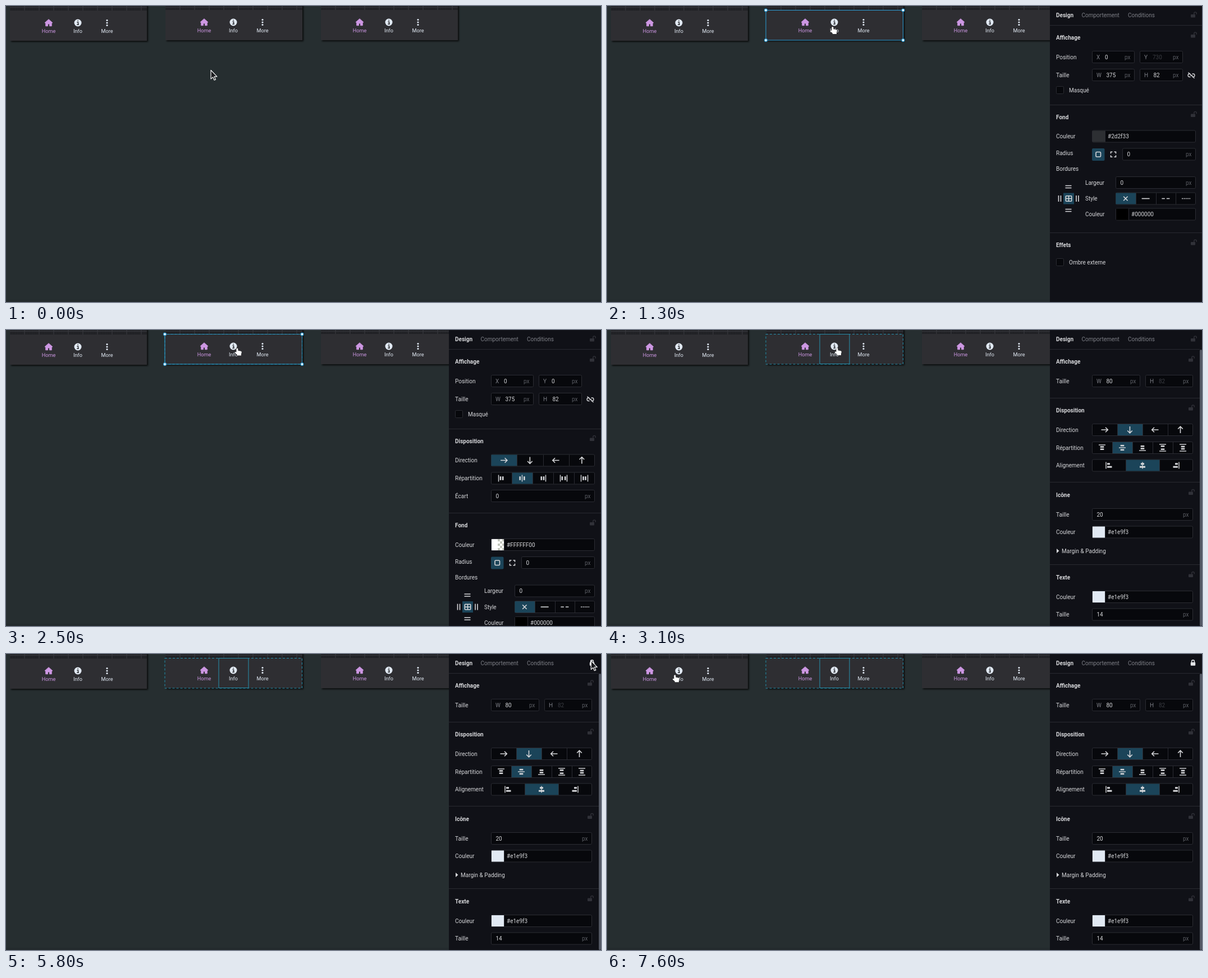
Write an HTML page that moves like this. It is 1060 by 528 pixels and loops after 8000 ms.

```html
<!DOCTYPE html>
<html lang="fr">
<head>
<meta charset="utf-8">
<title>Design panel</title>
<style>
  html, body { margin: 0; width: 100%; height: 100%; overflow: hidden; background: #262e30; }
  svg { display: block; }
  text { font: 10px Roboto, sans-serif; fill: #d6d7da; white-space: pre; }
  .bold { font-weight: 700; }
  .tab { fill: #7d7f86; }
  .unit { fill: #5b5d64; }
  .off { fill: #3b3d43; }
  .bar text { font-size: 9.1px; text-anchor: middle; fill: #e1e9f3; }
  .bar .on { fill: #cd97e3; }
  .ico { fill: none; stroke: #d6d7da; stroke-width: 1.6; }
  .box { fill: #07080c; stroke: #2b2c33; }
  .active { fill: #1b4459; }
  .lock { fill: none; stroke: #303138; stroke-width: 1.4; }
  .edge { fill: none; stroke: #2f9fd8; }
  .knob { fill: #fff; stroke: #2f9fd8; stroke-width: 1.2; }
  .dash { stroke: #2790ad; stroke-dasharray: 4 3; }
</style>
</head>
<body>
<svg id="stage" width="1060" height="528" viewBox="0 0 1060 528">
  <defs>
    <filter id="shadow" x="-10%" y="-30%" width="120%" height="160%">
      <feDropShadow dx="2" dy="2" stdDeviation="1.8" flood-color="#000" flood-opacity=".75"/>
    </filter>
    <pattern id="fine" width="2.6" height="2.6" patternUnits="userSpaceOnUse">
      <path d="M0 .5H2.6M.5 0V2.6" stroke="#fff" stroke-opacity=".05" stroke-width=".6"/>
    </pattern>
  </defs>
</svg>
<script>
const LOOP = 8000;
const rect = (x, y, w, h, attrs = '') => `<rect x="${x}" y="${y}" width="${w}" height="${h}" ${attrs}/>`;
const path = (d, cls = 'ico', extra = '') => `<path d="${d}" class="${cls}" ${extra}/>`;
const at = (x, y, body, turn = 0) => `<g transform="translate(${x} ${y}) rotate(${turn})">${body}</g>`;
const group = (id, body) => `<g id="${id}">${body}</g>`;
const label = (x, y, s, cls = '') =>
  `<text x="${x}" y="${y + 3.5}" class="${cls}">${s.replace('&', '&amp;')}</text>`;
const box = (x0, x1, y, h = 21) => rect(x0 + .5, y - 10.5, x1 - x0 - 1, h, 'class="box" rx="2"');

// Preview bars
function bar(x, y, id) {
  let grid = rect(0, -y, 244, y, 'fill="#1c1d21"') + rect(0, -y, 244, y, 'fill="url(#fine)"');
  for (let gx = 25.5; gx < 244; gx += 26) grid += rect(gx, -y, 1, y, 'fill="#3c3d42"');
  grid += rect(0, 2 - y, 244, 1, 'fill="#37383d"');
  const home = path('M0-6.3L7 0H5.3V5.8H1.5V2H-1.5V5.8H-5.3V0H-7Z', '',
    'fill="#cd97e3" stroke="#cd97e3" stroke-width=".9" stroke-linejoin="round"');
  const info = '<circle r="6.5" fill="#e1e9f3"/>' +
    path('M-1.5-.7H.6V3M-1.8 3.2H1.9M-.7-3.6H.9', '', 'fill="none" stroke="#2d2f33" stroke-width="1.5"');
  const dots = [-4.5, 0, 4.5].map(d => `<circle cy="${d}" r="1.6" fill="#e1e9f3"/>`).join('');
  return `<g class="bar" transform="translate(${x} ${y})">
    <g filter="url(#shadow)">${rect(0, -y - 12, 244, y + 66, 'fill="#2d2f33"')}</g>
    ${grid}${at(69, 22, home)}${at(121, 22, info)}${at(173, 22, dots)}
    ${label(69, 36.7, 'Home', 'on')}${label(121, 36.7, 'Info')}${label(173, 36.7, 'More')}</g>`;
}

const frame = cls => rect(283, 7.5, 244.5, 53.5, `class="edge ${cls}"`);
const knobs = [283, 527.5].map(x => [7.5, 61].map(y =>
  `<circle cx="${x}" cy="${y}" r="2.4" class="knob"/>`).join('')).join('');

// Panel parts
const lock = (x, y) => at(x, y, rect(-5, -.5, 8, 5.5, 'rx="1" fill="#303138"') +
  path('M.8-.5V-2.4A2.2 2.2 0 0 1 5.2-2.4V-.8', 'lock'));
const closedLock = at(1044, 15.5, rect(-4.2, -.8, 8.4, 6, 'rx="1" fill="#e4e5e8"') +
  path('M-2.4-.5V-2.2A2.4 2.4 0 0 1 2.4-2.2V-.5', 'ico'));
const divider = (y, end = 1060) => rect(789, y, end - 789, 1, 'fill="#292a31"');
const section = (y, title, lockX = 1045) => label(800, y, title, 'bold') + lock(lockX, y - 5);

function field(x0, x1, y, value, { name = '', cls = '', valueX = x0 + 8.5, unit = true } = {}) {
  return box(x0, x1, y) + (name && label(x0 + 8, y, name, 'tab')) + label(valueX, y, value, cls) +
    (unit ? label(x1 - 18, y, 'px', 'unit') : '');
}
function color(x0, x1, y, value, fill) {
  return field(x0, x1, y, value, { valueX: x0 + 28, unit: false }) +
    rect(x0 + 1, y - 10, 22, 20, `fill="${fill}"`) + rect(x0 + 23, y - 10, 1, 20, 'fill="#2b2c33"');
}
function buttons(x0, x1, y, active, icons) {
  const w = (x1 - x0) / icons.length;
  let out = box(x0, x1, y) + rect(x0 + active * w + .5, y - 10, w, 20, 'class="active"');
  icons.forEach((icon, i) => {
    if (i) out += rect(Math.round(x0 + i * w), y - 10, 1, 20, 'fill="#2b2c33"');
    out += at(x0 + (i + .5) * w, y, icon);
  });
  return out;
}
const checkbox = (y, name) => rect(800.5, y - 6.5, 13, 13, 'class="box" rx="2"') + label(823, y, name);

const arrow = turn => at(0, 0, path('M-6 0H5.5M1.5-4.3L5.8 0L1.5 4.3'), turn);
const arrows = [0, 90, 180, 270].map(arrow);
const line = x => rect(x - .7, -6, 1.4, 12, 'fill="#d6d7da"');
const block = x => rect(x - 1.3, -3.3, 2.6, 6.6, 'fill="#d6d7da"');
const spreads = [
  line(-5) + block(-1.5) + block(2.7),
  block(-3.8) + line(0) + block(3.8),
  block(-2.7) + block(1.5) + line(5),
  line(-6) + block(-2.7) + block(2.7) + line(6),
  line(-6) + block(-2) + block(2) + line(6)
];
const strip = (x, y, w) => rect(x, y - 1.5, w, 3, 'fill="#d6d7da"');
const aligns = [
  line(-5) + strip(-3, -2.7, 5) + strip(-3, 2.7, 8.5),
  line(0) + strip(-3, -2.7, 6) + strip(-5, 2.7, 10),
  line(5) + strip(-2, -2.7, 5) + strip(-5.5, 2.7, 8.5)
];
const strokes = [
  path('M-3.7-3.7L3.7 3.7M3.7-3.7L-3.7 3.7'),
  path('M-7 0H7'),
  path('M-7 0H-1.5M1.5 0H7'),
  path('M-7 0H8', 'ico', 'stroke-dasharray="2 1.3"')
];
const pair = path('M-5.5-2H5.5M-5.5 2H5.5');

const header = end => rect(789, 0, 271, 528, 'fill="#101117"') +
  label(800, 16, 'Design', 'bold') + label(845.5, 16, 'Comportement', 'tab') +
  label(928, 16, 'Conditions', 'tab') + divider(34, end);

const display = (y, cls) => section(56.5, 'Affichage') + label(800, 91, 'Position') +
  field(864, 940, 91, '0', { name: 'X', valueX: 887 }) +
  field(949, 1026, 91, y, { name: 'Y', valueX: 972, cls }) + label(800, 123, 'Taille') +
  field(864, 940, 123, '375', { name: 'W', valueX: 889.5 }) +
  field(949, 1026, 123, '82', { name: 'H', valueX: 973.5 }) +
  at(1041, 123.5, path('M-1.5-2.5H-3.2A2.7 2.7 0 0 0-3.2 3H-1.5M1.5-2.5H3.2A2.7 2.7 0 0 1 3.2 3H1.5M-2 .2H2M-5.5-5L5.5 5.5',
    'ico', 'style="stroke-width:1.3"')) +
  checkbox(150, 'Masqué') + divider(176);

const background = (dy, value, fill) => section(198 + dy, 'Fond') +
  label(800, 232.5 + dy, 'Couleur') + color(864, 1049, 232.5 + dy, value, fill) +
  label(800, 262.5 + dy, 'Radius') + rect(864, 254 + dy, 22.5, 22, 'class="active" rx="2"') +
  rect(871, 260.5 + dy, 8.5, 8.5, 'class="ico" rx="1.5"') +
  at(902, 264.8 + dy, path('M-4.5-1.5V-4.5H-1.5M1.5-4.5H4.5V-1.5M4.5 1.5V4.5H1.5M-1.5 4.5H-4.5V1.5')) +
  field(918, 1049, 264.5 + dy, '0') + label(800, 290.5 + dy, 'Bordures') +
  at(822, 322.5 + dy, pair) + at(822, 364.5 + dy, pair) +
  at(806.5, 343.5 + dy, pair, 90) + at(838, 343.5 + dy, pair, 90) +
  rect(813, 333.5 + dy, 19, 20, 'class="active"') +
  at(822.5, 343.5 + dy, rect(-5.2, -4.7, 10.4, 9.4, 'class="ico" rx="1"') + path('M0-4.7V4.7M-5.2 0H5.2')) +
  label(852, 315 + dy, 'Largeur') + field(906, 1049, 315 + dy, '0') +
  label(852, 343.5 + dy, 'Style') + buttons(906, 1049, 343.5 + dy, 0, strokes) +
  label(852, 371.5 + dy, 'Couleur') + color(906, 1049, 371.5 + dy, '#000000', '#000');

const checker = () => {
  let out = rect(865, 373, 22, 20, 'fill="#fff"');
  for (let r = 0; r < 5; r++)
    for (let c = r % 2; c < 3; c += 2) out += rect(876 + c * 4, 373 + r * 4, c < 2 ? 4 : 3, 4, 'fill="#c3c7bd"');
  return out;
};

const barPanel = header() + lock(1045, 15.5) + display('730', 'off') + background(0, '#2d2f33', '#2d2f33') +
  divider(404) + section(426.5, 'Effets') + checkbox(457, 'Ombre externe');

const rowPanel = header() + lock(1045, 15.5) + display('0', '') + section(198, 'Disposition') +
  label(800, 232.5, 'Direction') + buttons(864, 1049, 232.5, 0, arrows) +
  label(800, 264.5, 'Répartition') + buttons(864, 1049, 264.5, 1, spreads) +
  label(800, 296, 'Écart') + field(864, 1049, 296, '0') + divider(326) +
  background(150.5, '#FFFFFF00', '#fff') + checker();

const itemPanel = header(1056) + section(56.5, 'Affichage', 1041) + label(800, 91, 'Taille') +
  field(864, 950, 91, '80', { name: 'W', valueX: 889.5 }) +
  field(959, 1044, 91, '82', { name: 'H', valueX: 983, cls: 'off' }) + divider(121, 1056) +
  section(143.5, 'Disposition', 1041) +
  label(800, 178, 'Direction') + buttons(864, 1044, 178, 1, arrows) +
  label(800, 210, 'Répartition') + buttons(864, 1044, 210, 1, spreads.map(s => at(0, 0, s, 90))) +
  label(800, 241.5, 'Alignement') + buttons(864, 1044, 241.5, 1, aligns) + divider(271, 1056) +
  section(294, 'Icône', 1041) + label(800, 329, 'Taille') + field(864, 1044, 329, '20') +
  label(800, 360.5, 'Couleur') + color(864, 1044, 360.5, '#e1e9f3', '#e1e9f3') +
  path('M801 390L805.5 394L801 398Z', '', 'fill="#d6d7da"') + label(810, 394, 'Margin & Padding') +
  divider(418, 1056) + section(441, 'Texte', 1041) +
  label(800, 476, 'Couleur') + color(864, 1044, 476, '#e1e9f3', '#e1e9f3') +
  label(800, 507.5, 'Taille') + field(864, 1044, 507.5, '14') +
  rect(1056, 35, 4, 493, 'rx="2" fill="#525763"');

const stage = document.getElementById('stage');
stage.innerHTML += rect(0, 0, 1060, 528, 'fill="#262e30"') + rect(0, 524, 1060, 4, 'fill="#232a2d"') +
  bar(7, 8) + bar(284, 7) + bar(561, 7) +
  group('hover', frame('')) +
  group('barView', frame('') + knobs + barPanel) +
  group('rowView', frame('') + frame('dash') + knobs + rowPanel) +
  group('itemView', frame('dash') + rect(379, 7.5, 53, 53, 'class="edge" style="stroke:#2790ad"') + itemPanel) +
  group('unlocked', lock(1045, 15.5)) + group('locked', closedLock) +
  group('arrow', path('M0 0V15.6L3.6 12.3L6 17.8L8.5 16.7L6.1 11.4H10.9Z', '',
    'fill="#1b1c1f" stroke="#fff" stroke-width="1.1" stroke-linejoin="round"')) +
  group('hand', path('M-1.6 7V1.5A1.5 1.5 0 0 1 1.4 1.5V4.2L6.5 5.2Q8 5.6 7.8 7.2L7 10.4V13H-.2V11.4L-4 8.3Q-4.6 6.8-3 6.6Z', '',
    'fill="#fff" stroke="#1b1c1f" stroke-width=".7" paint-order="stroke"'));

const parts = {};
stage.querySelectorAll('g[id]').forEach(g => parts[g.id] = g);

// Pieces and the interval in which each is visible
const spans = {
  hover: [400, 600], barView: [1300, 2500], rowView: [2500, 3100],
  itemView: [3100, LOOP], unlocked: [3100, 5800], locked: [5800, LOOP]
};
// Pointer steps: time, shape, x, y
const pointer = [
  [0, 'arrow', 365, 114.5], [200, 'arrow', 367, 104], [300, 'arrow', 370, 84], [400, 'arrow', 373, 60],
  [500, 'hand', 377, 46], [600, 'hand', 378, 42], [800, 'hand', 390, 39], [900, 'hand', 402, 37],
  [1800, 'hand', 405, 35], [1900, 'hand', 409, 33], [2000, 'hand', 412, 32.5], [2900, 'hand', 410, 32],
  [3400, 'hand', 420, 35], [3500, 'hand', 450, 40], [3600, 'arrow', 508, 43], [3700, ''],
  [4000, 'arrow', 1053.5, 51.5], [4200, 'arrow', 1053.5, 35], [4400, 'arrow', 1050, 27],
  [4500, 'arrow', 1045, 18], [4600, 'arrow', 1042.3, 12], [6800, 'arrow', 1036, 14],
  [6900, 'arrow', 960, 34], [7000, 'arrow', 750, 58], [7100, 'arrow', 450, 60],
  [7200, 'arrow', 230, 50], [7300, 'hand', 113, 40], [7600, 'hand', 121, 37.3]
];

const show = (id, on) => parts[id].style.display = on ? '' : 'none';
const start = performance.now();
function draw(now) {
  const t = Math.max(0, now - start) % LOOP;
  for (const id in spans) show(id, t >= spans[id][0] && t < spans[id][1]);
  const [, shape, x, y] = pointer.findLast(step => step[0] <= t);
  for (const id of ['arrow', 'hand']) show(id, id === shape);
  if (shape) parts[shape].setAttribute('transform', `translate(${x} ${y})`);
  requestAnimationFrame(draw);
}
draw(start);
</script>
</body>
</html>
```
